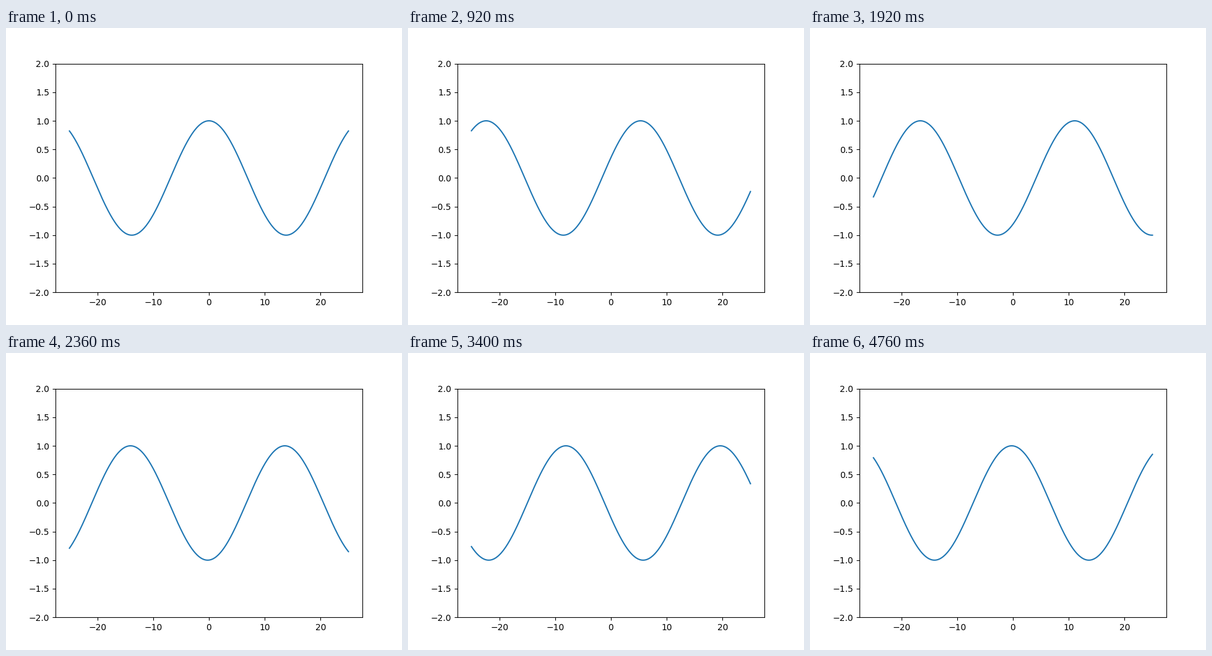
A matplotlib script for the animation above (4800 ms loop, 640 by 480 pixels).

```python
import matplotlib.pyplot as plt
import numpy as np
from matplotlib.animation import FuncAnimation

FRAMES = 120
INTERVAL = 40  # ms
WAVENUMBER = 0.2271

x = np.linspace(-25, 25, 500)


def wave(frame):
    """Cosine that travels one wavelength to the right per loop."""
    phase = 2 * np.pi * frame / FRAMES
    return np.cos(WAVENUMBER * x - phase)


fig, ax = plt.subplots(figsize=(6.4, 4.8), dpi=100)
line, = ax.plot(x, wave(0))
ax.set_ylim(-2, 2)


def update(frame):
    line.set_ydata(wave(frame))
    return line,


anim = FuncAnimation(fig, update, frames=FRAMES, interval=INTERVAL,
                     repeat=True, repeat_delay=0)
plt.show()
```
